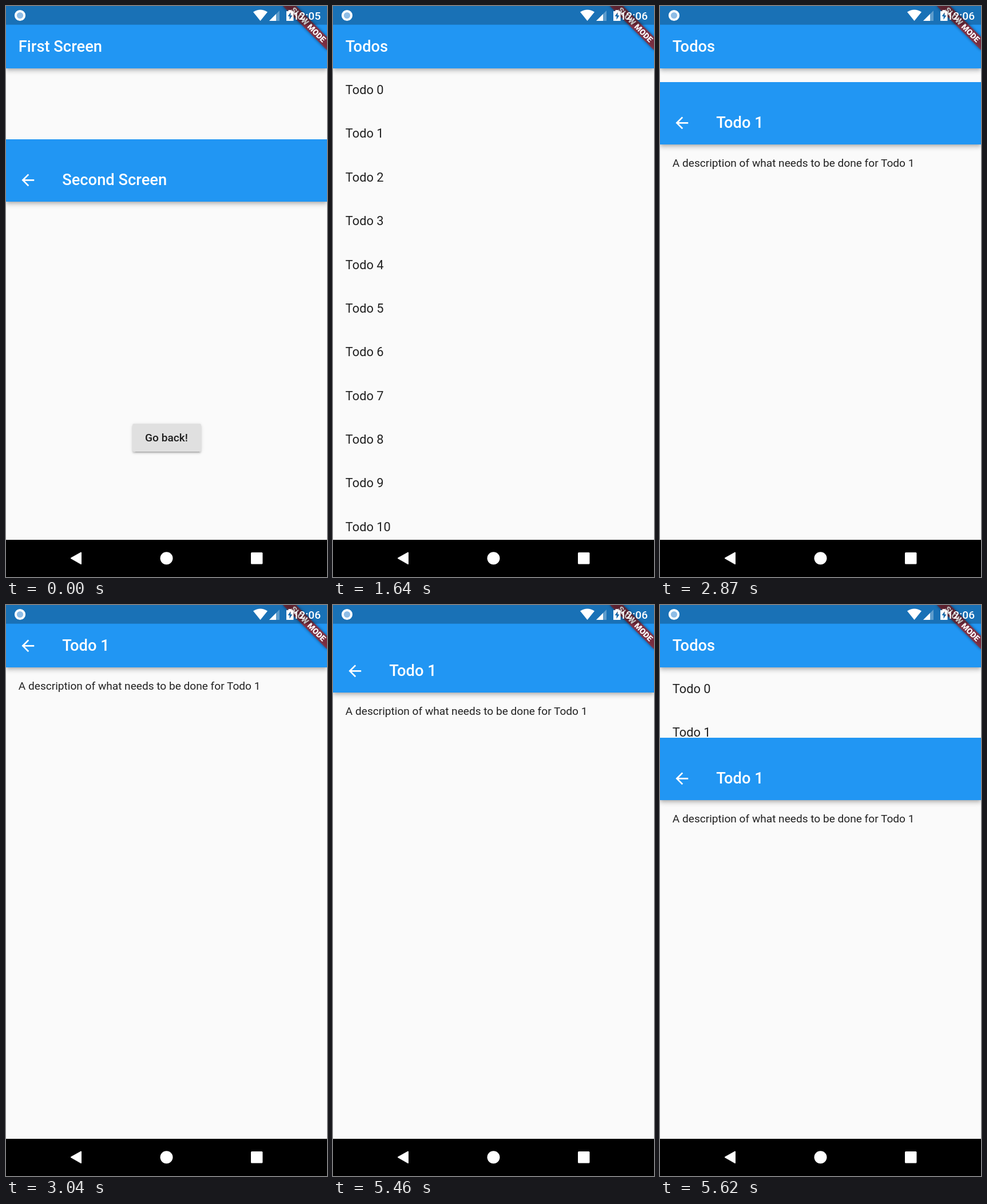
Recreate the animation shown at these times as an HTML page. Size 561x998 px, loop 6810 ms.

```html
<!DOCTYPE html>
<html lang="en">
<head>
<meta charset="utf-8">
<title>Screen navigation</title>
<style>
  html, body { margin: 0; width: 561px; height: 998px; overflow: hidden; background: #000; }
  body { position: relative; font-family: Roboto, sans-serif; color: rgba(0, 0, 0, .87); }
  #app { position: absolute; width: 561px; height: 933px; overflow: hidden; }
  .page { position: absolute; inset: 0; background: #fafafa; overflow: hidden; }
  header {
    position: absolute; width: 561px; height: 109px; background: #2196f3; color: #fff;
    box-shadow: 0 2.7px 5.5px -1.4px #0003, 0 5.5px 6.8px #00000024, 0 1.4px 13.6px #0000001f;
  }
  h1 { position: absolute; left: 21.8px; top: 32.7px; margin: 0; font: 500 27.3px/76.4px Roboto, sans-serif; white-space: nowrap; }
  .arrow { position: absolute; left: 21.8px; top: 54.6px; width: 32.7px; height: 32.7px; fill: #fff; }
  .arrow + h1 { left: 98.2px; }
  .list { position: absolute; left: 21.8px; top: 109.1px; font-size: 21.8px; line-height: 76.36px; }
  .note { position: absolute; left: 21.8px; top: 130.9px; font-size: 19.1px; line-height: 22.4px; white-space: nowrap; }
  .button {
    position: absolute; left: 220.5px; top: 497px; width: 120px; height: 49px; border-radius: 2.7px;
    background: #e0e0e0; text-align: center; font-weight: 500; font-size: 19.1px; line-height: 49px;
    box-shadow: 0 4px 1.4px -2.7px #0003, 0 2.7px 2.7px #00000024, 0 1.4px 6.8px #0000001f;
  }
  #system { position: absolute; left: 0; top: 0; }
</style>
</head>
<body>
<div id="app"></div>
<svg id="system" width="561" height="998" fill="#fff" font-family="Roboto, sans-serif">
  <g transform="translate(561 0) rotate(45)">
    <rect x="-54.6" y="38.2" width="109.2" height="16.4" fill="#000" opacity=".5" style="filter: blur(2.5px)"/>
    <rect x="-54.6" y="38.2" width="109.2" height="16.4" fill="#b71c1c" opacity=".627"/>
    <text y="51.2" font-size="13.9" font-weight="900" text-anchor="middle">SLOW MODE</text>
  </g>
  <rect width="561" height="32.7" fill="#000" opacity=".25"/>
  <circle cx="24.5" cy="16.5" r="7.6" fill="#8fbde6" stroke="#fff" stroke-width="4"/>
  <path d="M444.500 26L432 10.500Q444.500 2.500 457 10.500Z"/>
  <path d="M460 26H478V8Z" opacity=".3"/>
  <path d="M460 26H472V14Z"/>
  <path fill-rule="evenodd" d="M490 9H493.500V7H498.500V9H502.500V26H490ZM497.500 11L492.500 18H495.500V24L500.500 16.500H497.500Z"/>
  <text id="clock" x="550" y="23.6" font-size="19.1" font-weight="500" text-anchor="end"></text>
  <rect y="933" width="561" height="65" fill="#000"/>
  <path d="M114 965.200L131 955.500V975Z" stroke="#fff" stroke-width="2" stroke-linejoin="round"/>
  <circle cx="280.5" cy="965.2" r="11"/>
  <rect x="428" y="955" width="20.500" height="20.500" rx="1.5"/>
</svg>
<script>
const LOOP = 6810, DROP = 233, SLIDE = 300;
const app = document.getElementById('app');
const clock = document.getElementById('clock');
const arrow = '<svg class="arrow" viewBox="0 0 24 24"><path d="M20 11H7.83l5.59-5.59L12 4l-8 8 8 8 1.41-1.41L7.83 13H20z"/></svg>';

function addPage(title, body = '', back = false) {
  const page = document.createElement('div');
  page.className = 'page';
  page.innerHTML = `${body}<header>${back ? arrow : ''}<h1>${title}</h1></header>`;
  app.append(page);
  return page;
}

const rows = Array.from({ length: 11 }, (_, i) => `<div>Todo ${i}</div>`).join('');
const first = addPage('First Screen');
const second = addPage('Second Screen', '<div class="button">Go back!</div>', true);
const todos = addPage('Todos', `<div class="list">${rows}</div>`);
const detail = addPage('Todo 1', '<div class="note">A description of what needs to be done for Todo 1</div>', true);

// Cubic bezier (.4, 0, .2, 1), solved for x by bisection.
function fastOutSlowIn(x) {
  let lo = 0, hi = 1;
  for (let i = 0; i < 24; i++) {
    const s = (lo + hi) / 2, r = 1 - s;
    if (1.2 * s * r * r + .6 * s * s * r + s ** 3 < x) lo = s; else hi = s;
  }
  return lo * lo * (3 - 2 * lo);
}

const clamp = x => Math.max(0, Math.min(1, x));
// Pictures arrive every 40 ms, aligned to the end of each slide.
const snap = (t, end) => end - 40 * Math.ceil((end - t) / 40);
const show = (page, on) => { page.style.display = on ? '' : 'none'; };

function detailTop(t) {
  if (t < 5320) {
    const p = clamp((Math.min(snap(t, 3040), 3040) - 2743) / SLIDE);
    return Math.round(DROP * (1 - fastOutSlowIn(p)));
  }
  const p = clamp((Math.min(snap(t, 5620), 5620) - 5319.5) / SLIDE);
  return Math.min(DROP - 1, Math.round(DROP * (1 - fastOutSlowIn(1 - p))));
}

function draw() {
  const t = performance.now() % LOOP;
  const intro = t < 650;
  show(first, intro);
  show(second, intro);
  show(todos, !intro);
  show(detail, t >= 2790);
  second.style.top = DROP + 'px';
  detail.style.top = detailTop(t) + 'px';
  clock.textContent = intro ? '12:05' : '12:06';
  requestAnimationFrame(draw);
}
draw();
</script>
</body>
</html>
```
